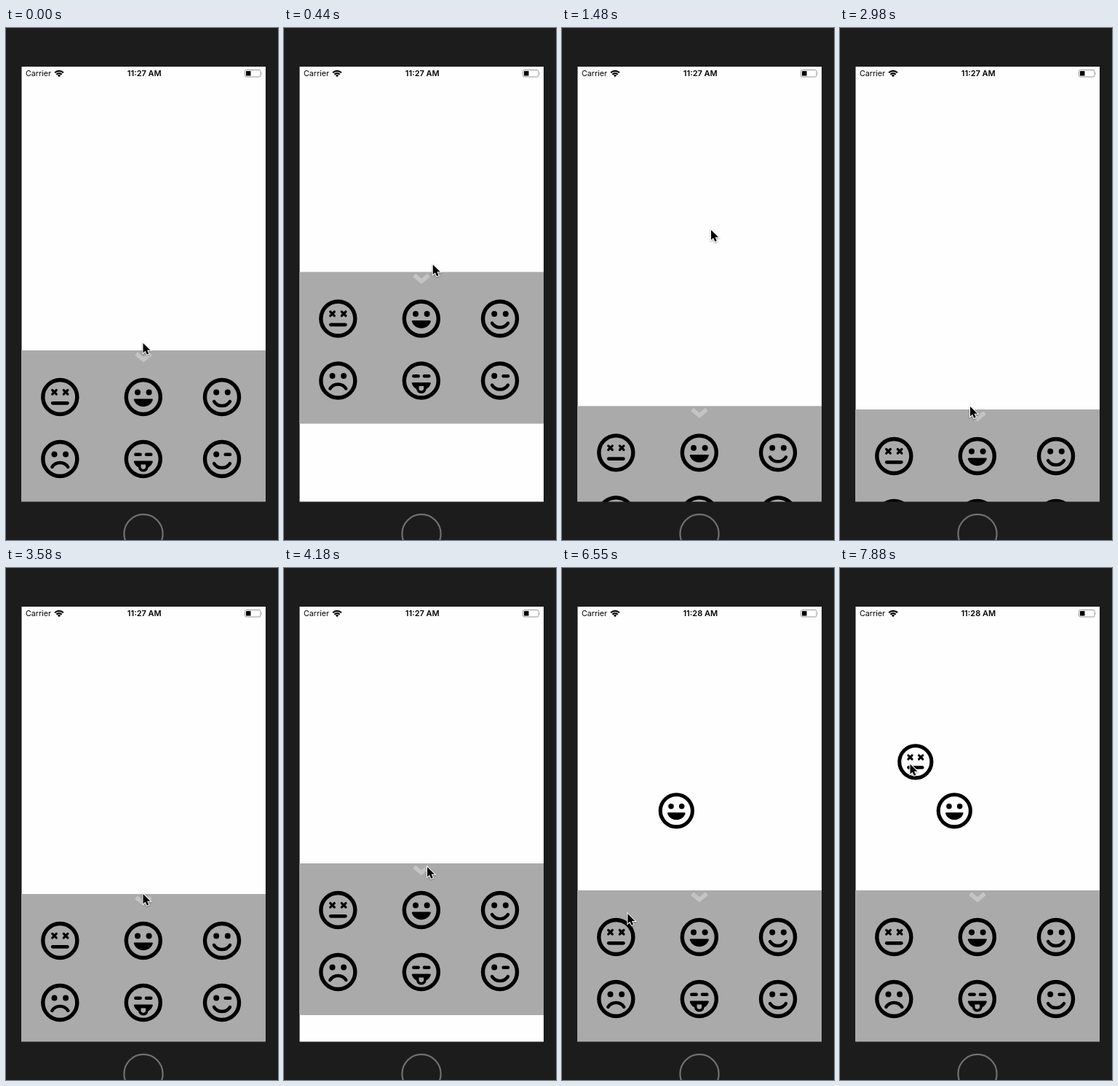
Write an HTML page that moves like this. It is 374 px wide and 702 px high and loops after 8 s.

```html
<!DOCTYPE html>
<html lang="en">
<head>
<meta charset="utf-8">
<title>Emoji tray</title>
<style>
  html, body { margin: 0; width: 100%; height: 100%; overflow: hidden; background: #1c1c1c; }
  svg { display: block; }
  text { font: 10.7px Inter, "Liberation Sans", sans-serif; }
  .line { fill: none; stroke: #000; stroke-width: 4.4; stroke-linecap: round; }
  #cursor { filter: drop-shadow(0 1px 1px rgba(0, 0, 0, .35)); }
</style>
</head>
<body>
<svg width="374" height="702" viewBox="0 0 374 702">
  <defs>
    <circle id="ring" r="23.5" fill="none" stroke="#000" stroke-width="5.4"/>
    <circle id="eye" r="4"/>
    <path id="dash" class="line" d="M-3.2 0H3.2"/>
    <path id="cross" class="line" style="stroke-width:3.2" d="M-2.8 -2.8L2.8 2.8M2.8 -2.8L-2.8 2.8"/>
    <path id="curve" class="line" d="M-11 6A13 13 0 0 0 11 6"/>
    <path id="mouth" d="M-12 2.6H12Q13.4 2.6 13 4.1C11 10 6 13.2 0 13.2S-11 10 -13 4.1Q-13.4 2.6 -12 2.6Z"/>
    <g id="eyes"><use href="#eye" x="-7.8" y="-6.5"/><use href="#eye" x="7.8" y="-6.5"/></g>

    <g id="dead">
      <use href="#ring"/><use href="#cross" x="-7.8" y="-6.7"/><use href="#cross" x="7.8" y="-6.7"/>
      <path class="line" style="stroke-width:4.8" d="M-10 8.3H10"/>
    </g>
    <g id="grin"><use href="#ring"/><use href="#eyes"/><use href="#mouth"/></g>
    <g id="smile"><use href="#ring"/><use href="#eyes"/><use href="#curve"/></g>
    <g id="frown">
      <use href="#ring"/><use href="#eyes"/>
      <path class="line" d="M-11 11A13 13 0 0 1 11 11"/>
    </g>
    <g id="tongue">
      <use href="#ring"/><use href="#dash" x="-7.3" y="-6.3"/><use href="#dash" x="7.3" y="-6.3"/>
      <use href="#mouth"/>
      <path d="M-6.7 9H6.7V11.3A6.7 6.3 0 0 1 -6.7 11.3Z"/>
      <path fill="#aaa" d="M-3.3 7.5H3.3V10.6A3.3 3.3 0 0 1 -3.3 10.6Z"/>
    </g>
    <g id="wink">
      <use href="#ring"/><use href="#eye" x="-7.8" y="-6.5"/><use href="#dash" x="7.8" y="-6.3"/>
      <use href="#curve"/>
    </g>
  </defs>

  <rect width="374" height="702" fill="#1c1c1c"/>
  <rect x="21.5" y="53" width="335.5" height="597" fill="#fefefe"/>

  <text x="27" y="66.2">Carrier</text>
  <g fill="none" stroke="#000" stroke-width="2.2">
    <path d="M67.1 61.2A8.4 8.4 0 0 1 78.9 61.2M69.4 63.7A5 5 0 0 1 76.6 63.7"/>
    <path fill="#000" stroke="none" d="M73 67.2L70.9 65A3 3 0 0 1 75.1 65Z"/>
  </g>
  <text id="clock" x="190.3" y="66.2" text-anchor="middle" style="font-weight:600;font-size:11px"></text>
  <rect x="328.5" y="57.5" width="21.5" height="9.5" rx="2" fill="none" stroke="#999"/>
  <rect x="330" y="59" width="6.5" height="6.5" rx=".6"/>
  <path d="M351.3 60.7Q352.6 62.2 351.3 63.8Z" fill="#777"/>

  <g id="tray">
    <rect x="21" width="336" height="208" fill="#aaa"/>
    <path d="M179 4.6L189 12.8L199 4.6" fill="none" stroke="#c4c4c4" stroke-width="5.8"/>
    <use href="#dead" x="74.3" y="64"/>
    <use href="#grin" x="188.8" y="64"/>
    <use href="#smile" x="297" y="64"/>
    <use href="#frown" x="74.3" y="149"/>
    <use href="#tongue" x="188.8" y="149"/>
    <use href="#wink" x="297" y="149"/>
  </g>

  <rect y="649.5" width="374" height="53" fill="#1c1c1c"/>
  <circle cx="189" cy="693.5" r="26.6" fill="none" stroke="#707070" stroke-width="2.2"/>

  <use id="newGrin" href="#grin"/>
  <use id="newDead" href="#dead"/>
  <path id="cursor" d="M0 0V13.5L3.1 10.7L5.3 15.8L7.8 14.7L5.6 9.8H10Z"
        stroke="#fff" stroke-width="2" paint-order="stroke"/>
</svg>
<script>
const LOOP = 8000, STEP = 148.8;
const OPEN = 442, CLOSED = 523;    // resting heights of the tray
const $ = id => document.getElementById(id);

// Cursor glides: start step, end step, destination.
const glides = [
  [0, 6, 221, 217], [7, 10, 205, 277], [10, 16, 179, 527],     // pull up, fling shut
  [18, 20, 179, 519], [20, 24, 188.5, 447],                    // pull open
  [26, 29, 200, 397], [29, 33, 210.5, 512.5],                  // pull up, let go
  [33, 35, 192, 526], [37, 40, 160, 343],                      // drag the grin
  [42, 45, 66, 520], [47, 53, 96.5, 269]                       // drag the dead face
];
const pulls = [
  { grab: 0, release: 8.47, rest: CLOSED },
  { grab: 20, release: 22, rest: OPEN },
  { grab: 26, release: 29, rest: OPEN }
];

function cursorAt(s) {
  let x = 188.5, y = 432;
  for (const [from, to, gx, gy] of glides) {
    const u = Math.min(1, Math.max(0, (s - from) / (to - from)));
    const e = u * u * (3 - 2 * u);
    x += (gx - x) * e;
    y += (gy - y) * e;
  }
  return [x, y];
}

// The tray follows the cursor while held, then springs to its resting height.
function trayAt(s) {
  let y = OPEN;
  for (const { grab, release, rest } of pulls) {
    if (s < grab) break;
    y += cursorAt(Math.min(s, release))[1] - cursorAt(grab)[1];
    const d = s - release;
    if (d >= 0) y = rest + (y - rest) * Math.exp(-1.1 * d) * Math.cos(Math.PI * d);
  }
  return y;
}

const move = (id, x, y, scale = 1) =>
  $(id).setAttribute("transform", `translate(${x} ${y}) scale(${scale})`);

// A new face follows the cursor between its first and last step.
function dragFace(id, s, first, last, dx, dy) {
  const [x, y] = cursorAt(Math.min(s, last));
  $(id).style.display = s < first ? "none" : "";
  move(id, x + dx, y + dy, 0.94);
}

function draw() {
  const s = Math.floor((performance.now() % LOOP + 9) / STEP);
  move("tray", 0, trayAt(s));
  dragFace("newGrin", s, 38, 40, -2.7, -10.2);
  dragFace("newDead", s, 49, 53, 7.3, -3.2);
  move("cursor", ...cursorAt(s));
  $("clock").textContent = s < 34 ? "11:27 AM" : "11:28 AM";
  requestAnimationFrame(draw);
}
draw();
</script>
</body>
</html>
```
